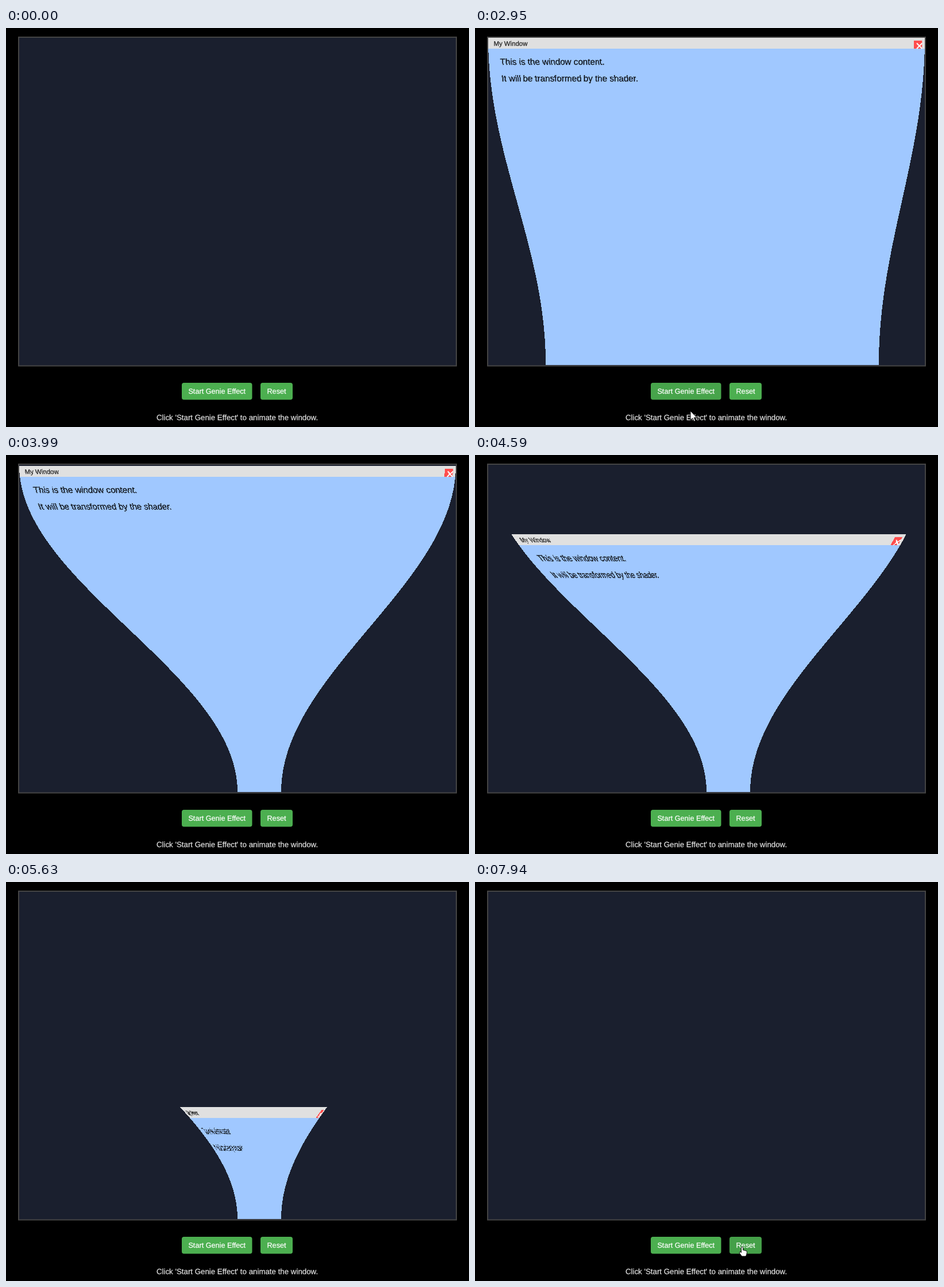
Animation of 806x695 px, one loop 8 s. Source, as an HTML page with a canvas:

```html
<!DOCTYPE html>
<html lang="en">
<head>
<meta charset="utf-8">
<title>Genie Effect</title>
<style>
  html, body { margin: 0; width: 100%; height: 100%; overflow: hidden; background: #000; }
  canvas { display: block; }
</style>
</head>
<body>
<canvas id="stage" width="806" height="695"></canvas>
<script>
const LOOP = 8000;
const FONT = '"Liberation Sans", Arial, sans-serif';
const VIEW = { x: 23, y: 17, w: 760, h: 570 };
const NECK = { left: 380, right: 304 }; // how far each side is pulled in at the bottom

// Moments of the loop, in ms
const OPEN = 2450, SLIDE = 3990, SINK = 5650;

const START = { x: 306, w: 122.5, label: 'Start Genie Effect' };
const RESET = { x: 443, w: 56, label: 'Reset' };
const BUTTON_Y = 618, BUTTON_H = 29.5;

const ARROW = new Path2D('M0 0V16L3.7 12.6L6.2 18.3L8.6 17.2L6.2 11.8H11.4Z');
const HAND = new Path2D('M-1.6 1.5Q0 -.8 1.6 1.5V6L6 7Q8.5 7.5 8.5 9.5L7.8 14L6.5 17H-.5L-4.5 11.5Q-5 9 -3 9L-1.6 10.5Z');

const ctx = document.getElementById('stage').getContext('2d');
ctx.imageSmoothingEnabled = false;
ctx.textRendering = 'geometricPrecision';

const ramp = (t, from, to) => Math.min(1, Math.max(0, (t - from) / (to - from)));
const easeOut = (t, from, to) => 1 - (1 - ramp(t, from, to)) ** 2;
const wave = u => (1 - Math.cos(Math.PI * u)) / 2;

// The screen refreshes ten times a second, counted afresh from each phase.
function refreshTime(t) {
  const base = [SINK, SLIDE, OPEN, 0].find(s => s <= t);
  return base + Math.floor((t - base) / 100) * 100;
}

function text(c, str, x, y, size, color, align = 'left') {
  c.font = `${size}px ${FONT}`;
  c.fillStyle = c.strokeStyle = color;
  c.textAlign = align;
  c.lineWidth = 0.25;
  c.fillText(str, x, y);
  c.strokeText(str, x, y);
}

function makeWindow() {
  const cv = document.createElement('canvas');
  cv.width = VIEW.w;
  cv.height = VIEW.h;
  const c = cv.getContext('2d');
  c.textRendering = 'geometricPrecision';
  c.fillStyle = '#a0c8ff';
  c.fillRect(0, 0, VIEW.w, VIEW.h);
  c.fillStyle = '#e0e0e0';
  c.fillRect(0, 0, VIEW.w, 19);
  text(c, 'My Window', 9.5, 14.25, 11.4, '#222');
  c.fillStyle = '#ff4d4d';
  c.fillRect(741, 5, 14.25, 14);
  c.strokeStyle = '#fff';
  c.lineWidth = 2;
  c.beginPath();
  c.moveTo(746, 9.5);
  c.lineTo(755.3, 19);
  c.moveTo(755.3, 9.5);
  c.lineTo(746, 19);
  c.stroke();
  text(c, 'This is the window content.', 19.5, 47, 15.2, '#0c1014');
  text(c, 'It will be transformed by the shader.', 19.5, 75.5, 15.2, '#0c1014');
  return cv;
}
const windowImage = makeWindow();

// Each row of the window is squeezed between the two curved sides.
function drawGenie(t) {
  if (t < OPEN) return;
  const pull = wave(ramp(t, 2425, 3955));
  const top = Math.round(0.199 * Math.max(0, t - 3980) + 0.136 * Math.max(0, t - 5190));
  for (let y = top; y < VIEW.h; y++) {
    const s = pull * wave(y / VIEW.h);
    const left = Math.round(VIEW.x + NECK.left * s);
    const right = Math.round(VIEW.x + VIEW.w - NECK.right * s);
    ctx.drawImage(windowImage, 0, y - top, VIEW.w, 1, left, VIEW.y + y, right - left, 1);
  }
}

function drawButton(b, hover) {
  const mix = (from, to) => Math.round(from + (to - from) * hover);
  ctx.fillStyle = `rgb(${mix(76, 69)},${mix(175, 160)},${mix(80, 73)})`;
  ctx.beginPath();
  ctx.roundRect(b.x, BUTTON_Y, b.w, BUTTON_H, 3.8);
  ctx.fill();
  text(ctx, b.label, b.x + b.w / 2, 637, 12.667, '#fff', 'center');
}

// First visit: approach, drift over the button, leave. Second: approach and drift.
function pointerAt(t) {
  if (t >= 400 && t < 3050) {
    const near = easeOut(t, 400, 1000), drift = ramp(t, 1200, 2200), leave = ramp(t, 2550, 2950);
    return [441 - 43 * near - 15.5 * drift - 7.5 * leave, 671 - 26 * near - 5 * drift + 27 * leave];
  }
  if (t >= 6350) {
    const near = easeOut(t, 6350, 7150), drift = ramp(t, 7150, 7850);
    return [492 - 28 * near + drift, 694 - 54 * near - 5 * drift];
  }
}

function drawPointer(t) {
  const tip = pointerAt(t);
  if (!tip) return;
  const [x, y] = tip;
  const over = [START, RESET].some(b =>
    x >= b.x && x <= b.x + b.w && y >= BUTTON_Y && y <= BUTTON_Y + BUTTON_H);
  const shape = over ? HAND : ARROW;
  ctx.save();
  ctx.translate(x, y);
  ctx.lineWidth = 1;
  ctx.lineJoin = 'round';
  ctx.strokeStyle = '#000';
  ctx.fillStyle = '#fff';
  ctx.fill(shape);
  ctx.stroke(shape);
  ctx.restore();
}

function draw(t) {
  ctx.fillStyle = '#000';
  ctx.fillRect(0, 0, 806, 695);
  ctx.fillStyle = '#444';
  ctx.fillRect(VIEW.x - 2, VIEW.y - 2, VIEW.w + 4, VIEW.h + 4.5);
  ctx.fillStyle = '#1a1f2e';
  ctx.fillRect(VIEW.x, VIEW.y, VIEW.w, VIEW.h + 0.5);
  drawGenie(t);
  drawButton(START, ramp(t, 800, 1100) - ramp(t, 2880, 3180));
  drawButton(RESET, ramp(t, 6860, 7160));
  text(ctx, "Click 'Start Genie Effect' to animate the window.", 402.5, 683, 13.3, '#ddd', 'center');
  drawPointer(t);
}

const begin = performance.now();
function tick() {
  draw(refreshTime((performance.now() - begin) % LOOP));
  requestAnimationFrame(tick);
}
tick();
</script>
</body>
</html>
```
